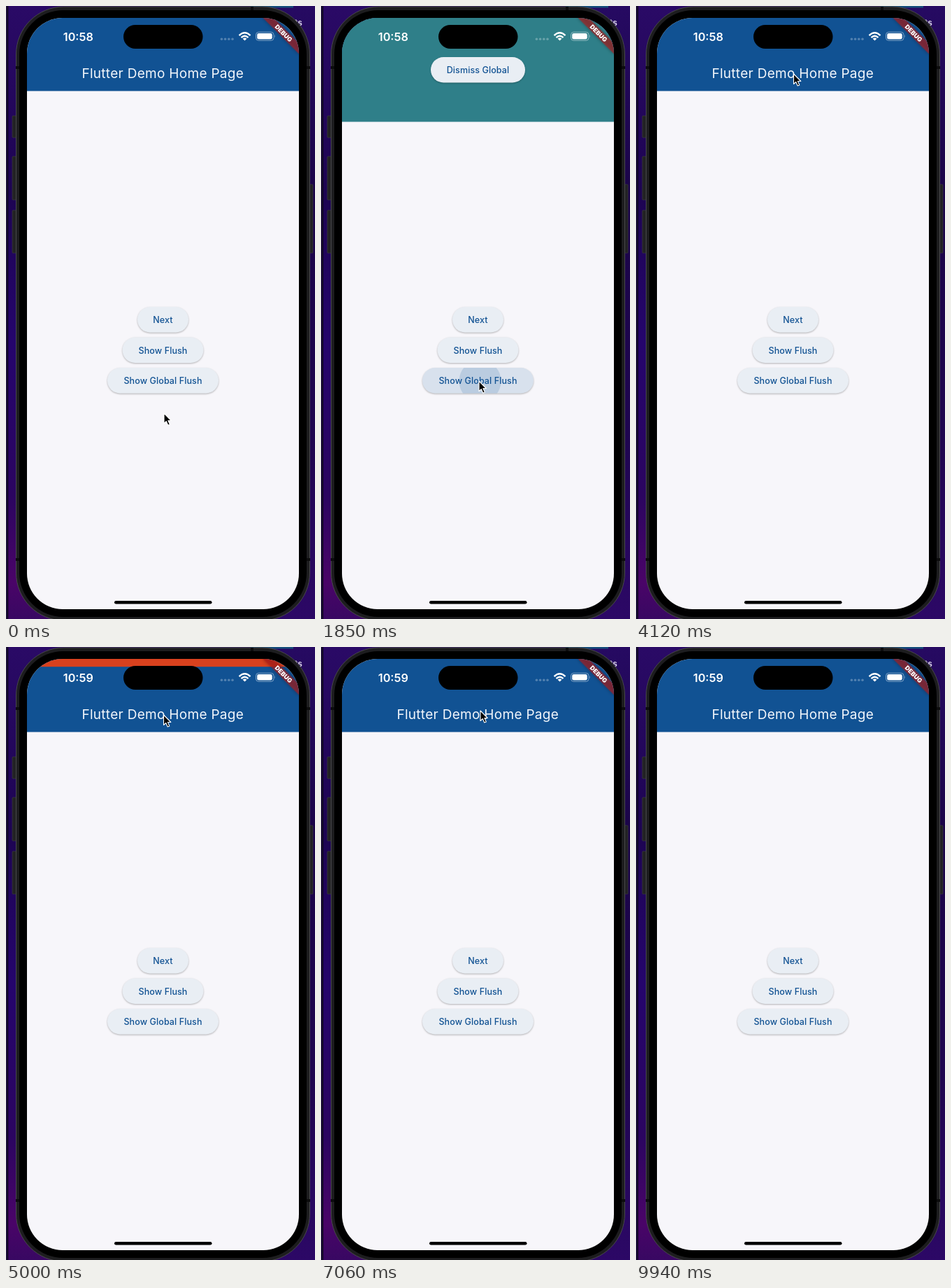
An HTML page for the animation above (9970 ms loop, 442 by 876 pixels).

```html
<!DOCTYPE html>
<html lang="en">
<head>
<meta charset="utf-8">
<title>Flush demo</title>
<style>
  html, body { margin: 0; width: 100%; height: 100%; overflow: hidden; background: #1c0548; }
  svg { display: block; width: 442px; height: 876px; font-family: Inter, Roboto, sans-serif; }
  .label { font-size: 12.5px; font-weight: 500; letter-spacing: .1px; fill: #115293; text-anchor: middle; }
  .pill { fill: #e9eef4; filter: drop-shadow(0 1px 1px rgba(0, 0, 0, .28)); }
</style>
</head>
<body>
<svg viewBox="0 0 442 876">
  <defs>
    <linearGradient id="leftWall" x2="0" y2="1">
      <stop offset="0" stop-color="#2a0a66"/><stop offset=".3" stop-color="#1d0452"/>
      <stop offset=".55" stop-color="#25056c"/><stop offset=".8" stop-color="#2b0560"/>
      <stop offset=".94" stop-color="#4a0468"/><stop offset="1" stop-color="#380862"/>
    </linearGradient>
    <linearGradient id="rightWall" x2="0" y2="1">
      <stop offset="0" stop-color="#260a62"/><stop offset=".3" stop-color="#1b0548"/>
      <stop offset=".7" stop-color="#1f0650"/><stop offset="1" stop-color="#2c0866"/>
    </linearGradient>
    <clipPath id="screen"><rect x="30" y="17" width="389" height="845" rx="51"/></clipPath>
    <clipPath id="globalPill"><rect x="145" y="517" width="159" height="36.5" rx="18.25"/></clipPath>
  </defs>

  <rect width="221" height="876" fill="url(#leftWall)"/>
  <rect x="221" width="221" height="876" fill="url(#rightWall)"/>
  <rect width="2" height="876" fill="#1b1038"/>
  <rect x="2" width="1.2" height="876" fill="#0a0418"/>
  <rect x="350" width="61" height="2.5" fill="#174f7c"/>
  <text x="413" y="28" font-size="12" font-weight="600" fill="#e4dff0">ts</text>

  <g fill="#222224" stroke="#3b3b3e" stroke-width=".7">
    <rect x="9" y="157" width="6" height="31" rx="1"/>
    <rect x="9" y="215" width="6" height="62" rx="1"/>
    <rect x="9" y="292" width="6" height="61" rx="1"/>
    <rect x="433" y="255" width="6" height="98" rx="1"/>
  </g>
  <rect x="14.5" y="1" width="420" height="877" rx="68" fill="#1d1d1f" stroke="#48484b"/>
  <rect x="19" y="6" width="411" height="867" rx="63"/>
  <path d="M14 88h5M430 88h5M14 791h5M430 791h5M352 1v5" stroke="#0c0c0d" stroke-width="4"/>

  <g clip-path="url(#screen)">
    <rect x="30" y="17" width="389" height="845" fill="#f7f6fa"/>
    <rect x="30" y="17" width="389" height="104.5" fill="#115293"/>
    <text x="224.3" y="103" font-size="19" letter-spacing=".3" fill="#f3f7fc" text-anchor="middle">Flutter Demo Home Page</text>

    <rect class="pill" x="188" y="430" width="73" height="36.5" rx="18.25"/>
    <rect class="pill" x="166.5" y="473.5" width="116" height="36.5" rx="18.25"/>
    <rect class="pill" x="145" y="517" width="159" height="36.5" rx="18.25"/>
    <g id="ripple" clip-path="url(#globalPill)" fill="#115293">
      <rect x="145" y="517" width="159" height="37" fill-opacity=".08"/>
      <circle id="splash" cx="227.5" cy="536" fill-opacity=".15"/>
    </g>
    <text class="label" x="224.5" y="453">Next</text>
    <text class="label" x="224.5" y="496.5">Show Flush</text>
    <text class="label" x="224.5" y="540">Show Global Flush</text>

    <g id="globalFlush">
      <rect x="30" y="17" width="389" height="148.5" fill="#2f7f89"/>
      <rect class="pill" x="157" y="73" width="135" height="36.5" rx="18.25"/>
      <text class="label" x="224.5" y="96">Dismiss Global</text>
    </g>
    <rect id="redFlush" x="30" y="17" width="389" height="104" fill="#d9411e"/>

    <g transform="translate(419 17) rotate(45)">
      <rect x="-36.4" y="25.5" width="72.8" height="10.9" fill="#b71c1c" fill-opacity=".63"
        style="filter: drop-shadow(0 0 2.5px rgba(0, 0, 0, .5))"/>
      <text y="34.2" font-size="8.8" font-weight="900" fill="#fff" text-anchor="middle">DEBUG</text>
    </g>
  </g>

  <text id="clock" x="103.3" y="49.6" font-size="16.2" font-weight="600" fill="#fff" text-anchor="middle"></text>
  <rect x="168" y="27" width="113.5" height="34" rx="17"/>
  <g fill="#fff">
    <g fill-opacity=".28">
      <circle cx="308.4" cy="47.3" r="1.8"/><circle cx="313.6" cy="47.3" r="1.8"/>
      <circle cx="318.8" cy="47.3" r="1.8"/><circle cx="324" cy="47.3" r="1.8"/>
    </g>
    <g fill="none" stroke="#fff" stroke-width="2.4">
      <path d="M333.5 42.2Q341.5 34.4 349.500 42.2"/>
      <path d="M336.500 45.2Q341.5 40.4 346.500 45.2"/>
    </g>
    <path d="M338.6 46.700Q341.5 44.300 344.4 46.700L341.5 49.600Z"/>
    <rect x="357.5" y="37.3" width="25.5" height="12" rx="3.8" fill="none" stroke="#fff" stroke-opacity=".45"/>
    <rect x="359.2" y="39" width="21.500" height="8.6" rx="2.4"/>
    <path d="M384.300 41.300q1.500 2 0 4z" fill-opacity=".5"/>
  </g>
  <rect x="155" y="850" width="139.500" height="4.600" rx="2.3"/>

  <g id="cursor">
    <g id="ring" fill="none">
      <circle cy="1" r="19.500" stroke="#000" stroke-width="6.500"/>
      <circle cy="1" r="19.500" stroke="#fff" stroke-width="2.2"/>
    </g>
    <path d="M0 0V14.500L3.300 11.500L5.700 17L8.300 15.900L5.900 10.500H10.300Z"
      stroke="#fff" stroke-width="1.100" stroke-linejoin="round"/>
  </g>
</svg>
<script>
const LOOP = 9970;
const el = Object.fromEntries([...document.querySelectorAll('svg [id]')].map(e => [e.id, e]));

// Cursor stops: time, x, y
const stops = [
  [0, 226, 582], [700, 226, 582], [1250, 226, 536], [2100, 226, 536], [2850, 225.500, 97],
  [5900, 225.500, 97], [6200, 228, 91], [7400, 228, 91], [7900, 225, 110],
  [8400, 225, 110], [9100, 240, -30], [LOOP, 240, -30]
];

const smooth = (t, start, length) => {
  const u = Math.min(1, Math.max(0, (t - start) / length));
  return u * u * (3 - 2 * u);
};
const between = (t, a, b) => t >= a && t < b;
const show = (node, on) => node.setAttribute('visibility', on ? 'visible' : 'hidden');

function slide(node, height, t, open, close) {
  const shown = smooth(t, open, 250) - smooth(t, close, 250);
  node.setAttribute('transform', `translate(0 ${(shown - 1) * height})`);
  show(node, shown > 0);
}

function moveCursor(t) {
  const i = stops.findIndex(s => s[0] > t);
  const [t0, x0, y0] = stops[i - 1], [t1, x1, y1] = stops[i];
  const k = smooth(t, t0, t1 - t0);
  el.cursor.setAttribute('transform', `translate(${x0 + (x1 - x0) * k} ${y0 + (y1 - y0) * k})`);
}

function draw(t) {
  slide(el.globalFlush, 148.500, t, 1590, 3160);
  slide(el.redFlush, 104, t, 4950, 6023);
  moveCursor(t);
  show(el.ring, between(t, 1480, 1620) || between(t, 3080, 3400));
  show(el.ripple, between(t, 1500, 2200));
  el.ripple.setAttribute('opacity', 1 - smooth(t, 1900, 300));
  el.splash.setAttribute('r', 6 + 24 * smooth(t, 1500, 350) + 55 * smooth(t, 1860, 300));
  el.clock.textContent = t < 4200 ? '10:58' : '10:59';
}

function tick() {
  draw(performance.now() % LOOP);
  requestAnimationFrame(tick);
}
tick();
</script>
</body>
</html>
```
